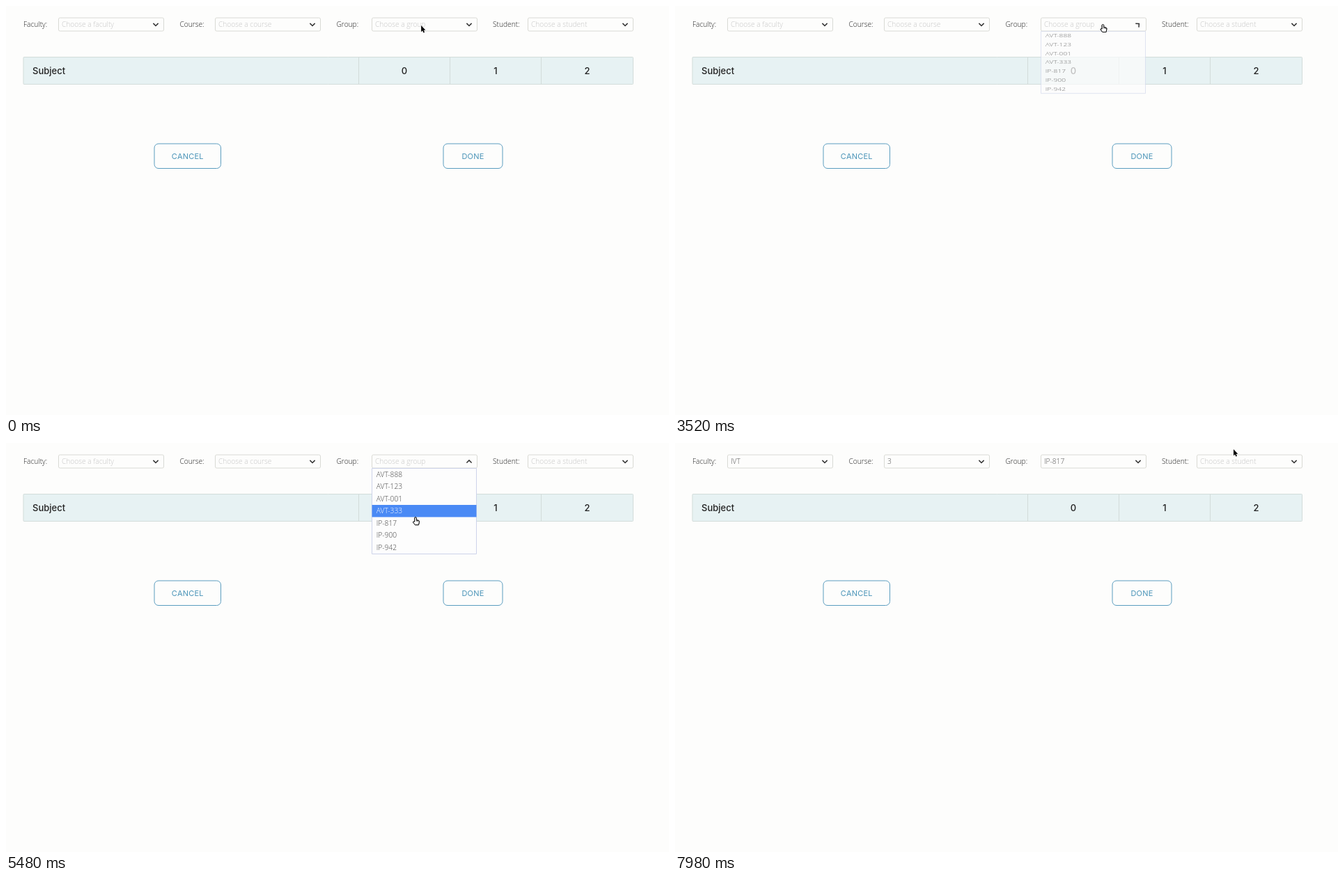
Write an HTML page with a canvas that moves like this. It is 952 by 588 pixels and loops after 8 s.

```html
<!DOCTYPE html>
<html lang="en">
<head>
<meta charset="utf-8">
<title>Student form</title>
<style>
html, body { margin: 0; width: 100%; height: 100%; overflow: hidden; background: #fdfdfc; }
canvas { display: block; }
</style>
</head>
<body>
<canvas id="stage" width="952" height="588"></canvas>
<script>
const ctx = document.getElementById('stage').getContext('2d');
const LOOP = 8000;
const SMALL = '300 10.2px "Open Sans", sans-serif';
const HEAD = '500 13px Inter, sans-serif';
const BUTTON = '400 11px Inter, sans-serif';

const fields = [
  { label: 'Faculty:', lx: 25, x: 75.5, hint: 'Choose a faculty', value: 'IVT' },
  { label: 'Course:', lx: 249.5, x: 300.5, hint: 'Choose a course', value: '3' },
  { label: 'Group:', lx: 474.5, x: 525.5, hint: 'Choose a group', value: 'IP-817' },
  { label: 'Student:', lx: 699, x: 749.5, hint: 'Choose a student' }
];
const options = ['AVT-888', 'AVT-123', 'AVT-001', 'AVT-333', 'IP-817', 'IP-900', 'IP-942'];
const menu = { x: 525.5, y: 36.5, w: 150, row: 17.5 };
const OPEN = 3400, PICK = 6600, FADE = 300;

// Pointer path: time, x, y
const path = [
  [0, 596, 28], [400, 617, 27], [2520, 617, 27], [3100, 614.5, 26.5],
  [4180, 614.5, 26.5], [4740, 602.5, 66.3], [5480, 588, 106.7],
  [5860, 584, 110.5], [6280, 584, 112], [6900, 584, 112],
  [7280, 588, 108], [7980, 802, 9]
];
const arrow = new Path2D('M0 0V9.2L2 7.3 3.4 10.5 5 9.8 3.6 6.8H6.3Z');
const hand = new Path2D('M-1.3 6.5V.8Q0 -.8 1.2 .8V4L4.5 4.7Q5.6 5 5.4 6.5L4.5 11H-.6L-3.3 7.5Q-3.5 6.1 -2.4 6.3Z');
const knuckles = new Path2D('M1.2 4V6M2.6 4.4V6.1M4 4.7V6.3');

const clamp = v => Math.min(1, Math.max(0, v));
const ease = v => 1 - (1 - clamp(v)) ** 2.5;

function text(str, x, y, font, color, align = 'left') {
  ctx.font = font;
  ctx.fillStyle = color;
  ctx.textAlign = align;
  ctx.fillText(str, x, y);
}

function box(x, y, w, h, r, stroke, fill) {
  ctx.beginPath();
  ctx.roundRect(x, y, w, h, r);
  if (fill) { ctx.fillStyle = fill; ctx.fill(); }
  ctx.strokeStyle = stroke;
  ctx.lineWidth = 1;
  ctx.stroke();
}

function chevron(x, y, turn) {
  ctx.save();
  ctx.translate(x, y);
  ctx.rotate(-Math.PI * turn);
  ctx.beginPath();
  ctx.moveTo(-3.6, -1.8);
  ctx.lineTo(0, 1.8);
  ctx.lineTo(3.6, -1.8);
  ctx.strokeStyle = '#333';
  ctx.lineWidth = 1.5;
  ctx.stroke();
  ctx.restore();
}

function pointerAt(t) {
  let i = 1;
  while (i < path.length - 1 && t > path[i][0]) i++;
  const [t0, x0, y0] = path[i - 1], [t1, x1, y1] = path[i];
  let k = clamp((t - t0) / (t1 - t0));
  if (i === 1) k = ease(k);
  if (i === path.length - 1) k = k * k * (3 - 2 * k);
  return [x0 + (x1 - x0) * k, y0 + (y1 - y0) * k];
}

function drawForm(t, shown) {
  fields.forEach((f, i) => {
    const value = t >= PICK && f.value;
    text(f.label, f.lx, 30.2, SMALL, '#222');
    box(f.x, 17, 151, 19, 2, '#d9dad5');
    text(value || f.hint, f.x + 4.5, 30.2, SMALL, value ? '#555' : '#c6c6c6');
    chevron(f.x + 139.5, 26.7, i === 2 ? shown : 0);
  });
}

function drawTable() {
  box(25, 73.5, 875.5, 39, 1, '#d2dcda', '#e7f2f3');
  ctx.beginPath();
  for (const x of [506.5, 637.5, 768.5]) {
    ctx.moveTo(x, 74);
    ctx.lineTo(x, 112);
  }
  ctx.stroke();
  text('Subject', 38, 98, HEAD, '#222');
  [572, 703, 834.5].forEach((x, i) => text(i, x, 98, HEAD, '#222', 'center'));
}

function drawButton(label, x, w) {
  box(x, 198, w, 35.5, 6, '#5b9dbf');
  ctx.letterSpacing = '0.2px';
  text(label, x + w / 2, 219.6, BUTTON, '#4a94b8', 'center');
  ctx.letterSpacing = '0px';
}

function drawMenu(shown, hover) {
  if (shown <= 0) return;
  const { x, y, w, row } = menu;
  ctx.save();
  ctx.globalAlpha = shown;
  ctx.translate(x, y);
  ctx.scale(1, shown);
  box(0, 0, w, row * options.length + .5, 0, '#cdd3ea', '#fdfdfd');
  options.forEach((name, i) => {
    const on = i === hover;
    if (on) {
      ctx.fillStyle = '#4a8af5';
      ctx.fillRect(0, i * row, w, row);
    }
    text(name, 6.3, i * row + 12.3, SMALL, on ? '#fff' : '#444');
  });
  ctx.restore();
}

function drawPointer(x, y, isHand) {
  ctx.save();
  ctx.translate(x, y);
  ctx.lineJoin = 'round';
  ctx.lineWidth = 1;
  ctx.strokeStyle = isHand ? '#111' : '#fff';
  ctx.fillStyle = isHand ? '#fff' : '#000';
  const shape = isHand ? hand : arrow;
  ctx.stroke(shape);
  ctx.fill(shape);
  if (isHand) {
    ctx.stroke(shape);
    ctx.lineWidth = .7;
    ctx.stroke(knuckles);
  }
  ctx.restore();
}

function draw(t) {
  const shown = ease((t - OPEN) / FADE) * (1 - ease((t - PICK) / FADE));
  const [x, y] = pointerAt(t);
  const hover = Math.floor((Math.min(y, 112) - menu.y - .3) / menu.row);
  ctx.fillStyle = '#fdfdfc';
  ctx.fillRect(0, 0, 952, 588);
  drawForm(t, shown);
  drawTable();
  drawButton('CANCEL', 213, 95.5);
  drawButton('DONE', 628, 85);
  drawMenu(shown, hover);
  drawPointer(x, y, t >= 2520 && t < 6460);
}

const start = performance.now();
function tick() {
  draw((performance.now() - start) % LOOP);
  requestAnimationFrame(tick);
}
tick();
</script>
</body>
</html>
```
